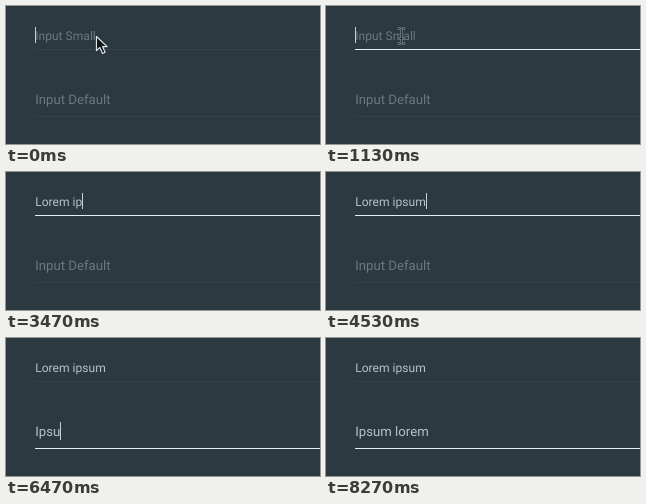
Write an HTML page that moves like this. It is 314 px wide and 138 px high and loops after 8740 ms.

```html
<!DOCTYPE html>
<html lang="en">
<head>
<meta charset="utf-8">
<title>Input fields</title>
<style>
  html, body { margin: 0; width: 100%; height: 100%; overflow: hidden; background: #2d3940; }
  svg { display: block; width: 314px; height: 138px; }
  text { font-family: Roboto, sans-serif; text-rendering: geometricPrecision; white-space: pre; }
  .caret { fill: #c6cfd4; }
</style>
</head>
<body>
<svg viewBox="0 0 314 138">
  <defs>
    <path id="bar" d="M-2.5 -7.5H-1.5L0 -6L1.5 -7.5H2.5M0 -6V6M-1.5 2.5H1.5M-2.5 7.5H-1.5L0 6L1.5 7.5H2.5"
      fill="none" stroke-linecap="square"/>
  </defs>
  <g id="small">
    <rect class="line" x="29" y="43" width="285" height="1"/>
    <text x="29.2" y="34" font-size="12.1"></text>
    <rect class="caret" y="21" width="1" height="16"/>
  </g>
  <g id="default">
    <rect class="line" x="29" y="110" width="285" height="1"/>
    <text x="29.2" y="98" font-size="13.2"></text>
    <rect class="caret" y="84" width="1" height="18"/>
  </g>
  <path id="arrow" d="M.5 .5V14.7L3.9 11.5L6.6 17.4L9.2 16.2L6.6 10.6H11.2Z"
    fill="#11181c" stroke="#e3e8ea" stroke-width="1.1" stroke-linejoin="round"/>
  <g id="beam">
    <use href="#bar" stroke="#79858b" stroke-width="2.4"/>
    <use href="#bar" stroke="#263036" stroke-width="1"/>
  </g>
</svg>
<script>
const LOOP = 8740, LEFT = 29;
const DIM = [53, 65, 71], LIT = [230, 238, 242];
const FADE_DELAY = 40, FADE = 200;
const BLINK_DELAY = 130, BLINK = 1000, BLINK_ON = 530;
const POINTER_MOVE = 270, BEAM_FROM = 130;

// bursts of typing: [first key, gap between keys, letters]
const fields = [
  { id: 'small', hint: 'Input Small', value: 'Lorem ipsum', focus: 0, blur: 4600,
    bursts: [[1200, 176, 5], [3070, 200, 3], [4070, 165, 3]] },
  { id: 'default', hint: 'Input Default', value: 'Ipsum lorem', focus: 4600, blur: Infinity,
    bursts: [[5800, 216, 5], [6800, 0, 1], [7130, 150, 5]] }
];

const $ = id => document.getElementById(id);
const clamp = v => Math.min(1, Math.max(0, v));
const easeOut = v => 1 - (1 - v) ** 3;
const fade = dt => easeOut(clamp((dt - FADE_DELAY) / FADE));
const mix = k => `rgb(${DIM.map((c, i) => Math.round(c + (LIT[i] - c) * k))})`;
const show = (el, on) => el.setAttribute('visibility', on ? 'visible' : 'hidden');

for (const f of fields) {
  for (const part of ['line', 'text', 'caret']) {
    f[part] = $(f.id).querySelector(part === 'text' ? 'text' : '.' + part);
  }
  f.keys = f.bursts.flatMap(([first, gap, n]) => Array.from({ length: n }, (_, i) => first + i * gap));
}

function drawField(f, t) {
  const typed = f.keys.filter(k => k <= t);
  const count = typed.length;
  f.text.textContent = count ? f.value.slice(0, count) : f.hint;
  f.text.setAttribute('fill', count ? '#b5c1c7' : '#6b787e');

  const width = count ? f.text.getComputedTextLength() : 0;
  const since = t - (count ? typed[count - 1] : f.focus + BLINK_DELAY);
  const blinkOn = since < 0 || since % BLINK < BLINK_ON;
  f.caret.setAttribute('x', Math.round(LEFT + width));
  show(f.caret, t >= f.focus && t < f.blur && blinkOn);

  f.line.setAttribute('fill', mix(fade(t - f.focus) - fade(t - f.blur)));
}

function drawPointer(t) {
  const x = 90 - 15 * clamp(t / POINTER_MOVE);
  $('arrow').setAttribute('transform', `translate(${x} 30)`);
  $('beam').setAttribute('transform', `translate(${x + .5} 30)`);
  show($('arrow'), t < BEAM_FROM);
  show($('beam'), t >= BEAM_FROM && t < fields[0].keys[0]);
}

const start = performance.now();
function draw(now) {
  const t = Math.max(0, now - start) % LOOP;
  fields.forEach(f => drawField(f, t));
  drawPointer(t);
  requestAnimationFrame(draw);
}
draw(start);
</script>
</body>
</html>
```
